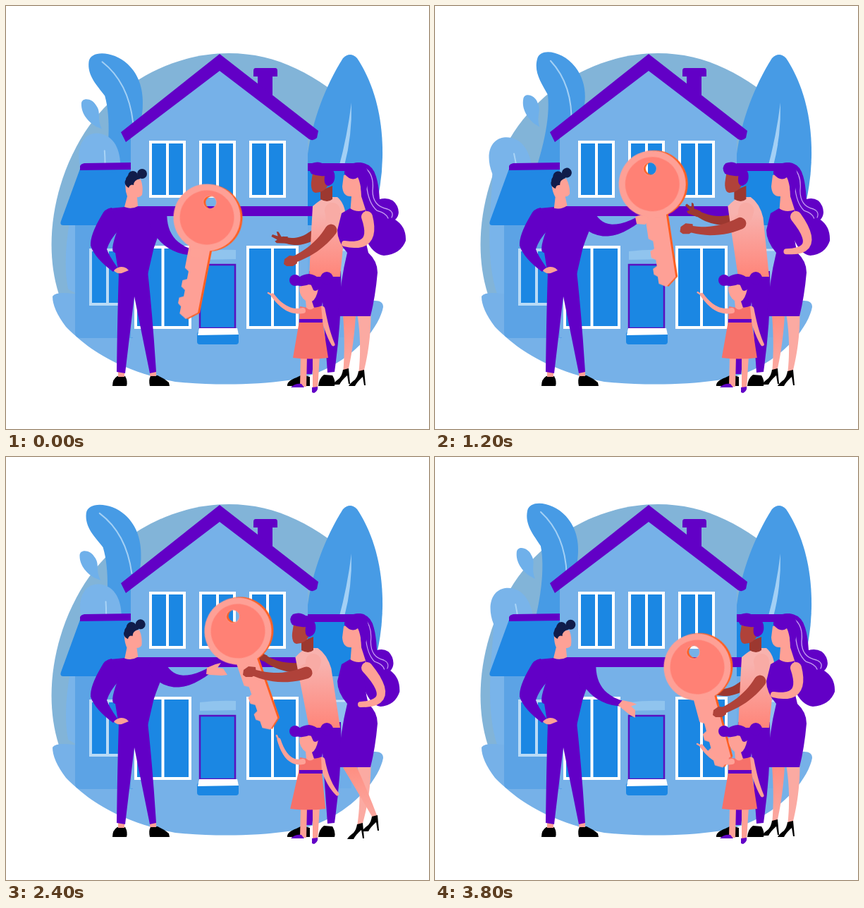
These frames come from a looping animation (600 px wide and 600 px high, 4 s). An HTML page:

```html
<!DOCTYPE html>
<html lang="en">
<head>
<meta charset="utf-8">
<title>House key handover</title>
<style>
html, body { margin: 0; width: 100%; height: 100%; overflow: hidden; background: #fff; }
svg { display: block; width: 100vw; height: 100vh; }
.purple { fill: #6200c6; }
.blue { fill: #1b87e3; }
.wall { fill: #76b1e8; }
.skin { fill: #fea196; }
.brown { fill: #b0423a; }
.dark { fill: #9c3830; }
.navy { fill: #101c4a; }
.pane { fill: #1b87e3; stroke: #fff; stroke-width: 4; }
.line { fill: none; stroke-linecap: round; }
</style>
</head>
<body>
<svg viewBox="0 0 600 600">
<defs>
  <linearGradient id="shirt" x1="0" y1="0" x2="0" y2="1">
    <stop offset=".2" stop-color="#f8b2ae"/><stop offset="1" stop-color="#ff8579"/>
  </linearGradient>
  <linearGradient id="leg" x1="0" y1="0" x2="0" y2="1">
    <stop offset="0" stop-color="#ff8a7d"/><stop offset="1" stop-color="#fbaaa2"/>
  </linearGradient>
  <path id="shoe" d="M4-2L6 20H4L2 8Q-6 15-9 21L-18 21Q-17 18-9 12Q-5 7-4 0Z"/>
  <path id="shaft" d="M-17 42L13 44V135L-2 147L-12 141V131L-17 127V119L-11 116V107L-17 103V94L-11 91V80L-17 76Z"/>
  <path id="ring" fill-rule="evenodd" d="M-47.5 0a47.5 47.5 0 1 1 95 0a47.5 47.5 0 1 1-95 0M-9-22a9 9 0 1 0 18 0a9 9 0 1 0-18 0"/>
</defs>

<!-- backdrop -->
<path fill="#82b4d8" d="M75 409C50 330 72 235 118 170C165 105 240 67 316 67C385 67 440 97 500 150V420Z"/>
<g id="leafTop">
  <path fill="#6fb0ea" d="M104 140C104 130 120 132 125 142C133 152 126 160 134 175L126 172C115 166 104 155 104 140Z"/>
  <path fill="#479be5" d="M113 80C115 63 148 64 168 82C186 98 192 120 191 145C190 165 183 185 178 235H140C144 205 147 160 137 128C125 113 111 100 113 80Z"/>
  <path class="line" stroke="#a3d0f5" stroke-width="2" d="M132 80Q170 108 178 165"/>
</g>
<g id="leafLow">
  <path fill="#79b4ea" d="M88 400C78 340 100 275 109 228C103 200 114 180 133 180C155 181 166 200 166 225C165 300 140 370 105 410Z"/>
  <path class="line" stroke="#a9d4f6" stroke-width="2" d="M144 205Q146 240 138 280"/>
</g>
<path fill="#479be5" d="M478 74Q488 64 498 74C525 115 535 165 534 215Q533 260 520 300H428V210C434 165 452 115 478 74Z"/>
<path fill="#a3d0f5" d="M490 137Q491 185 480 226L472 229Q484 185 490 137Z"/>
<path class="wall" d="M66 412Q70 405 95 408L510 420Q535 414 535 427C529 460 480 520 400 531C350 538 290 538 240 533C150 515 110 480 85 455Q66 430 66 412Z"/>

<!-- house -->
<path fill="#5ca3e5" d="M98 305H180V471H106Q98 471 98 463Z"/>
<path fill="#2188e4" d="M105 231H178V311H81Q76 311 78 305Z"/>
<path class="purple" d="M178 222V232L105 233V227Q106 224 111 223Z"/>
<path fill="#6fade8" d="M428 300H490V470H428Z"/>
<path class="blue" d="M428 232H492V311H428Z"/>
<path class="purple" d="M428 223H500V234H428Z"/>
<path fill="#8fc0ee" stroke="#c5e2f9" stroke-width="3" d="M450 346H488V423H450Z"/>
<g id="sidePane"></g>
<path class="wall" d="M177 180L303 80L428 180V470H177Z"/>
<path class="purple" d="M357 98H378V142L357 125Z"/>
<path class="purple" d="M354 88H382Q385 88 385 92V100H351V92Q351 88 354 88Z"/>
<path class="purple" d="M303 68L443 177L441 187Q436 192 430 189L303 92L170 193L163 179Z"/>
<path class="purple" d="M177 284H437V298H177Z"/>
<g id="panes"></g>
<path fill="#90c4ee" d="M275 348Q300 345 326 346V359L275 360Z"/>
<path class="blue" stroke="#5a10c0" stroke-width="2.5" d="M275 457V367H325V457Z"/>
<rect class="blue" x="271" y="462" width="59" height="18" rx="4"/>
<path fill="#fff" d="M274 457H328L330 466L272 467Z"/>

<!-- man -->
<path d="M151 539Q151 529 158 525L169 525Q173 532 171 539ZM204 539Q202 530 205 525L215 524Q224 528 231 534L232 539Z"/>
<path class="skin" d="M159 516H168V526H159ZM204 516H213V525H204Z"/>
<path class="purple" d="M160 376H201Q208 440 213 519L204 521L182 412L169 521L157 519Q158 440 160 376Z"/>
<path class="purple" d="M148 287L169 285Q180 289 191 285L218 289Q227 292 224 306Q212 335 209 346L201 381H160L155 350Q146 350 158 318L148 300Z"/>
<path class="purple" d="M150 286Q140 287 135 298Q119 325 120 340Q126 358 152 377L158 371Q146 354 143 345Q148 330 160 318Z"/>
<path class="skin" d="M153 375Q162 367 171 372L174 375L164 379Q156 380 153 375Z"/>
<g id="manHead">
  <path class="skin" d="M170 246H191Q195 256 193 268Q190 272 186 271L187 284Q178 289 168 285L172 270Q168 260 170 246Z"/>
  <g class="navy">
    <circle cx="193" cy="238" r="7"/><circle cx="180" cy="241" r="7"/><circle cx="175" cy="246" r="5"/>
    <path d="M173 240H190V245Q181 247 181 254Q176 252 174 258Q167 254 169 248Z"/>
  </g>
</g>
<path id="manArm" class="purple"/>
<path id="farArm" class="dark"/>
<path id="farHand" class="dark" d="M5-5L-4-3L-9-9L-12-9L-9-3L-17-4L-18-1L-9 2L-12 5L-9 7L5 5Z"/>

<!-- key -->
<g id="key">
  <g fill="#ff5f22" transform="translate(3 0)"><use href="#shaft"/><use href="#ring"/></g>
  <g fill="#fea096"><use href="#shaft"/><use href="#ring"/></g>
  <path fill="#ff8175" d="M0-38.5a38.5 38.5 0 1 0 .1 0ZM0-31.500a9.500 9.500 0 1 1-.1 0Z" fill-rule="evenodd"/>
</g>
<path id="palm" class="skin" d="M-3-4L9-9L17-11L12-4L20-3L26 6L18 7L2 6L-4 5Z"/>
<path id="grip" class="skin" d="M-4-4Q4-8 12-4L14 2L10 7L-2 6Z"/>

<!-- father -->
<path d="M399 539Q398 532 412 527L420 523L431 526V539ZM443 539Q444 528 451 523L463 524Q468 532 466 539Z"/>
<path class="purple" d="M430 376H475Q477 440 466 519L456 520L449 420L434 522H424Z"/>
<path fill="url(#shirt)" id="torso" d="M435 284Q446 274 456 271L470 271Q481 280 482 300L474 384H430L433 320Z"/>
<g id="dadHead">
  <path class="dark" d="M446 262L463 255V274Q456 280 446 274Z"/>
  <path class="brown" d="M435 237H458V252Q452 265 439 265Q432 264 433 250Z"/>
  <path class="purple" d="M433 238Q427 229 434 223Q444 219 452 225Q462 225 466 238Q468 251 458 255Q450 255 452 241Q443 242 433 238Z"/>
</g>
<path id="sleeve" fill="#f8aba5"/>
<path id="nearArm" class="brown"/>
<path id="nearHand" class="brown" d="M7-6L-3-7L-10-2L-11 5L-7 8L2 8L8 4Z"/>

<!-- mother -->
<path id="legBack" fill="#fbaaa2"/>
<use id="shoeBack" href="#shoe"/>
<path id="legFront" fill="url(#leg)"/>
<use id="shoeFront" href="#shoe"/>
<g id="hair">
  <path class="purple" d="M482 234Q486 222 503 222Q520 224 525 242Q529 255 530 274Q548 270 555 284Q560 296 552 303Q568 313 567 333Q560 352 536 354Q520 352 510 330L500 270Z"/>
  <path class="line" stroke="#c9a3f2" stroke-width="1.300" d="M505 227Q523 236 520 262Q520 284 541 288Q551 292 547 300M511 246Q512 278 526 290Q540 294 542 301"/>
</g>
<path class="skin" d="M479 240L502 236L504 270L511 292L488 296L490 270Q478 271 477 256Z"/>
<path class="purple" d="M480 238Q479 223 500 222Q515 225 514 246Q512 264 505 272Q503 250 499 243Q490 250 480 238Z"/>
<path class="purple" d="M476 294L488 287Q498 294 510 289Q505 315 514 350Q527 362 527 378Q524 412 517 440H471Q474 390 484 350Q470 334 470 318Z"/>
<path id="momArm" class="skin"/>

<!-- girl -->
<path class="skin" d="M418 496H427L426 540H417ZM435 496H445L442 544H435Z"/>
<path class="purple" d="M404 541Q410 535 419 536L423 541ZM434 548V541L442 540Q443 546 437 549Z"/>
<path id="girlBack" class="skin"/>
<path id="dress" fill="#f6716a" d="M417 426Q432 430 447 426L449 447L457 499Q432 502 407 499L416 447Z"/>
<path class="purple" d="M416 444H449V449H416Z"/>
<circle class="purple" cx="410" cy="389" r="8"/><circle class="purple" cx="455" cy="386" r="9"/>
<path class="skin" d="M416 399Q430 390 443 401Q440 416 434 419L437 428Q431 433 426 428L425 418Q416 412 416 399Z"/>
<path class="purple" d="M411 396Q412 381 430 380Q447 382 445 399Q441 406 436 403L432 394Q422 399 411 396Z"/>
<path id="girlArm" class="skin"/>
<path id="finger" class="line" stroke="#fea196" stroke-width="2.500" d="M1 1L-6-3"/>
</svg>
<script>
const LOOP = 4000, STEP = 200;
const $ = id => document.getElementById(id);
const set = (id, name, value) => $(id).setAttribute(name, value);
const move = (id, value) => set(id, 'transform', value);
const place = (id, x, y, turn = 0) => move(id, `translate(${x} ${y}) rotate(${turn})`);
const mix = (a, b, u) => a.map((v, i) => v + (b[i] - v) * u);
const wave = (t, period, shift = 0) => Math.cos(2 * Math.PI * (t - shift) / period);

function ease(t, from, to) {
  const u = Math.min(1, Math.max(0, (t - from) / (to - from)));
  return u * u * (3 - 2 * u);
}

function pane(group, x, y, w, h, edge = '#fff') {
  $(group).innerHTML += `<path class="pane" style="stroke:${edge}"
    d="M${x} ${y}h${w}v${h}h${-w}ZM${x + w / 2} ${y}v${h}"/>`;
}
for (let i = 0; i < 3; i++) pane('panes', 205 + 71 * i, 193, 48, 77);
pane('panes', 184, 342, 77, 114);
pane('panes', 343, 342, 70, 114);
pane('sidePane', 120, 346, 48, 77, '#b9dbf6');

// Tapered quadratic limb
function limb(id, [x0, y0, cx, cy, x1, y1], w0, w1) {
  const left = [], right = [], n = 12;
  for (let i = 0; i <= n; i++) {
    const u = i / n, v = 1 - u;
    const x = v * v * x0 + 2 * u * v * cx + u * u * x1;
    const y = v * v * y0 + 2 * u * v * cy + u * u * y1;
    const dx = v * (cx - x0) + u * (x1 - cx), dy = v * (cy - y0) + u * (y1 - cy);
    const k = (w0 + (w1 - w0) * u) / 2 / (Math.hypot(dx, dy) || 1);
    left.push(`${x - dy * k} ${y + dx * k}`);
    right.unshift(`${x + dy * k} ${y - dx * k}`);
  }
  const cap = w => `A${w / 2} ${w / 2} 0 0 0 `;
  set(id, 'd', `M${left.join('L')}${cap(w1)}${right.join('L')}${cap(w0)}${left[0]}Z`);
}

// The man lifts the key, the father takes it and lowers it
const lift = t => ease(t, 300, 1200);
const take = t => ease(t, 1100, 1800);
const lower = t => ease(t, 2800, 3600);

const keyAt = t => ({
  x: 285 + 22 * lift(t) + 22 * take(t) + 43 * lower(t),
  y: 300 - 47 * lift(t) - 6 * take(t) + 51 * lower(t),
  turn: 11 - 19 * lift(t) - 11 * take(t) + 4 * lower(t)
});

function drawKey(t) {
  const key = keyAt(t), a = keyAt(t - 50), b = keyAt(t + 50);
  place('key', key.x, key.y, key.turn);
  $('key').style.filter = `blur(${Math.hypot(b.x - a.x, b.y - a.y) / 10}px)`;
}

function drawMan(t) {
  move('manHead', `rotate(${4.500 * wave(t, 2000) - 4.500} 180 280)`);
  const raise = lift(t) - ease(t, 3000, 3700);
  const arm = mix([215, 300, 222, 342, 266, 350], [215, 300, 240, 334, 288, 303], raise);
  limb('manArm', arm, 27, 8);
  const free = take(t) > .3;
  place('palm', arm[4], arm[5], 35 * (1 - raise));
  place('grip', arm[4], arm[5]);
  $('palm').style.display = free ? '' : 'none';
  $('grip').style.display = free ? 'none' : '';
}

function drawFather(reach) {
  const lean = -27 * reach;
  const skew = Math.atan(-lean / 110) * 180 / Math.PI;
  move('torso', `translate(430 384) skewX(${skew}) translate(-430 -384)`);
  place('dadHead', lean, 0);
  const far = mix([440, 322, 416, 340, 394, 331], [413, 299, 385, 299, 364, 283], reach);
  const near = mix([461, 318, 441, 347, 405, 361], [426, 306, 385, 320, 347, 304], reach);
  limb('farArm', far, 14, 8);
  place('farHand', far[4], far[5], 10 + 25 * reach);
  limb('sleeve', [463 + lean, 290, (463 + lean + near[0]) / 2 + 3, 302, near[0], near[1] - 4], 22, 18);
  limb('nearArm', near, 17, 9);
  place('nearHand', near[4], near[5]);
}

function drawMother(reach, stride) {
  move('hair', `translate(500 0) scale(${1 - .13 * reach} 1) translate(-500 0)`);
  limb('momArm', mix([512, 299, 526, 346, 480, 337], [512, 299, 556, 350, 503, 351], reach), 16, 8);
  const ax = 482 + 41 * stride, ay = 516 - 6 * stride, bx = 504 - 2 * stride, by = 518 + 3 * stride;
  limb('legBack', [508, 438, 511, 478, bx, by], 19, 7);
  limb('legFront', [487, 438, (ax + 487) / 2 + 3, 478, ax, ay], 18, 7);
  place('shoeBack', bx, by);
  place('shoeFront', ax, ay);
}

function drawGirl(point) {
  const x = 378 + 9 * point, y = 410 - 9 * point;
  move('dress', `translate(0 426) skewX(${-3 * point}) translate(0 -426)`);
  limb('girlArm', [421, 432, 398, 437, x, y], 8, 5);
  limb('girlBack', [448, 430, 455, 462, 464 + 6 * point, 480 - 2 * point], 9, 5);
  place('finger', x, y, 36 * point);
}

function draw(t) {
  move('leafTop', `rotate(${5.400 - 5.400 * wave(t, 2050, 250)} 160 250)`);
  move('leafLow', `rotate(${-4.900 - 4.600 * wave(t, 2900, 1150)} 155 400)`);
  drawKey(t);
  drawMan(t);
  const reach = ease(t, 700, 1400) - ease(t, 2800, 3500);
  const stride = ease(t, 1200, 1800) - ease(t, 2800, 3600);
  drawFather(reach);
  drawMother(reach, stride);
  drawGirl(take(t) - ease(t, 3200, 3700));
}

const start = performance.now();
function frame(now) {
  const t = Math.max(0, now - start) % LOOP;
  draw(Math.floor(t / STEP) * STEP);
  requestAnimationFrame(frame);
}
draw(0);
requestAnimationFrame(frame);
</script>
</body>
</html>
```
